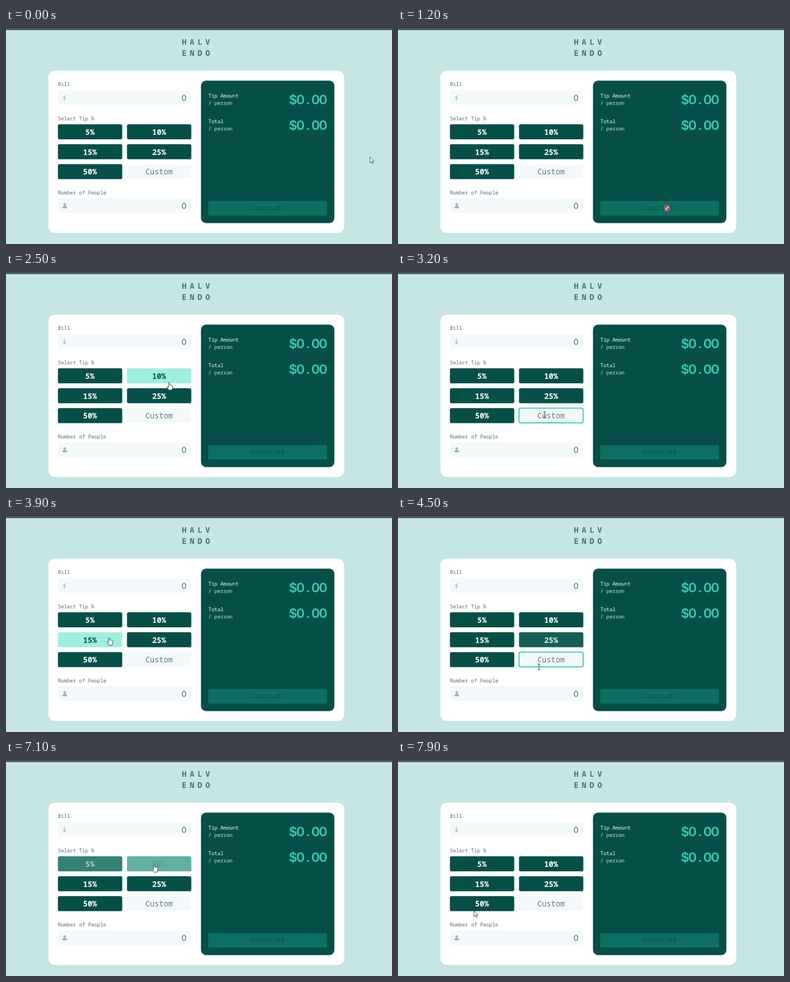
These frames come from a looping animation (690x388 px, 8 s). An HTML page:

```html
<!DOCTYPE html>
<html lang="en">
<head>
<meta charset="utf-8">
<title>Tip calculator</title>
<style>
  html, body { margin: 0; width: 100%; height: 100%; overflow: hidden; background: #c5e6e5; }
  svg { display: block; width: 690px; height: 388px; }
  text { font-family: "Noto Sans Mono", "DejaVu Sans Mono", monospace; white-space: pre; }
  .title { font-size: 13.5px; font-weight: 700; letter-spacing: 5.9px; fill: #4c6c6e; }
  .label { font-size: 9px; font-weight: 500; fill: #566b6c; }
  .tip { font-size: 13.8px; font-weight: 700; text-anchor: middle; }
  .hint { font-size: 13.6px; font-weight: 500; fill: #5e7c7d; text-anchor: middle; }
  .sign { font-size: 10.5px; font-weight: 600; fill: #9eb7b9; }
  .line { font-size: 9px; font-weight: 500; fill: #f4fbfa; }
  .sub { font-size: 9px; fill: #cde6e2; }
  .value { font: 500 13.8px Inter, sans-serif; fill: #5e7778; text-anchor: middle; }
  .sum { font: 600 23.2px Inter, sans-serif; fill: #34cdae; text-anchor: middle; }
  .calc { font: 10.7px "Liberation Sans", Arial, sans-serif; fill: #08534b; text-anchor: middle; }
</style>
</head>
<body>
<svg id="stage" viewBox="0 0 690 388" xmlns="http://www.w3.org/2000/svg"></svg>
<script>
const NS = 'http://www.w3.org/2000/svg';
const stage = document.getElementById('stage');
const LOOP = 8000, STEP = 100, FADE = 200;

function add(tag, attrs, parent = stage) {
  const el = document.createElementNS(NS, tag);
  for (const key in attrs) el.setAttribute(key, attrs[key]);
  parent.appendChild(el);
  return el;
}
const rect = (x, y, width, height, rx, fill) => add('rect', { x, y, width, height, rx, fill });
function text(str, x, y, cls) {
  const el = add('text', { x, y, class: cls });
  el.textContent = str;
  return el;
}

// Page and card
rect(0, 0, 690, 388, 0, '#c5e6e5');
rect(0, 0, 690, 3.7, 0, '#47565c');
text('HALV', 314.5, 30, 'title');
text('ENDO', 314.5, 50, 'title');
rect(75.8, 76.8, 528.8, 291.4, 12, '#fff');

// Form
const LEFT = 92.8, COL = 123.5, ROW = 35.7, TOP = 173;

function field(x, y, w, h) {
  return { x, y, w, h, kind: 'beam', box: rect(x, y, w, h, 3, '#f3f9fb') };
}
const bill = field(LEFT, 112, 238, 26);
const people = field(LEFT, 306, 238, 26.5);
const custom = field(LEFT + COL, TOP + 2 * ROW, 114.6, 26.6);
const fields = [bill, people, custom];

text('Bill', LEFT, 104.4, 'label');
text('Select Tip %', LEFT, 165.6, 'label');
text('Number of People', LEFT, 299.2, 'label');
text('$', 101.5, 129, 'sign');
add('circle', { cx: 105, cy: 317.1, r: 2.3, fill: '#9eb3b6' });
add('path', { d: 'M101 324v-1.6q0-2.6 2.6-2.6h2.8q2.6 0 2.6 2.6v1.6z', fill: '#9eb3b6' });
for (const f of [bill, people]) text('0', 318.2, f.y + 18.5, 'value');
text('Custom', 273.6, 263, 'hint');

const buttons = ['5%', '10%', '15%', '25%', '50%'].map((name, i) => {
  const x = LEFT + (i % 2) * COL, y = TOP + (i >> 1) * ROW;
  const box = rect(x, y, 115, 27, 3, '#064f49');
  const label = text(name, x + 57.3, y + 18.8, 'tip');
  return { x, y, w: 115, h: 26, box, label, kind: 'hand' };
});

// Result panel
rect(348.5, 94.5, 238.5, 256, 9, '#064f49');
['Tip Amount', 'Total'].forEach((name, i) => {
  const y = 125 + i * 46;
  text(name, 361.8, y, 'line');
  text('/ person', 361.8, y + 13.2, 'sub');
  [...'$0.00'].forEach((ch, n) => text(ch, 513 + n * 13.5, y + 12.2, 'sum'));
});
rect(361.5, 311, 212, 26, 2, '#0e6e62');
text('CALCULATE', 467.5, 328.2, 'calc');

// Areas that only change the pointer
const zones = [
  { x: 361.5, y: 311, w: 212, h: 26, kind: 'no' },
  { x: LEFT, y: 156, w: 238, h: 12, kind: 'beam' }
];
const areas = [...buttons, ...fields, ...zones];

// Pointer shapes, hot spot at 0,0
const cursors = {};
const cursor = kind => cursors[kind] = add('g', {});
add('path', {
  d: 'M0 0V10.4L2.4 8.2 4 12 5.8 11.2 4.2 7.6H7.3Z',
  fill: '#fff', stroke: '#3a4648', 'stroke-width': 0.9, 'stroke-linejoin': 'round'
}, cursor('arrow'));
add('path', {
  d: 'M-1.1 .6Q0-.8 1.1 .6V4.6Q5 3.6 6.4 7V10L5 13.6H-.4L-3.9 8.6Q-3.4 6.4-1.1 8.6Z',
  fill: '#fff', stroke: '#263638', 'stroke-width': 0.9, 'stroke-linejoin': 'round'
}, cursor('hand'));
add('path', {
  d: 'M-2.4-5H2.4M0-5V5M-2.4 5H2.4',
  fill: 'none', stroke: '#344446', 'stroke-width': 1
}, cursor('beam'));
const no = cursor('no');
add('circle', { r: 5.4, fill: '#fff' }, no);
add('path', {
  d: 'M-4.1 0A4.1 4.1 0 1 1 4.1 0A4.1 4.1 0 1 1-4.1 0M-2.9-2.9L2.9 2.9',
  fill: 'none', stroke: '#b3232d', 'stroke-width': 2
}, no);

// Key points of the pointer's walk: seconds, x, y
const stops = [
  [0, 650.5, 231.5], [0.4, 481, 323.5], [1.7, 481, 323.5],
  [1.9, 310, 318], [2.3, 286, 195], [2.5, 291.5, 198.5],
  [3.2, 262, 256], [3.5, 150, 250], [3.9, 184.5, 218.5],
  [4.1, 240, 187], [4.5, 252, 271], [5.3, 212, 320],
  [5.5, 212, 190], [5.8, 212, 190], [5.9, 160, 175], [6.1, 166.5, 161],
  [6.3, 200, 127], [6.7, 200, 127], [6.9, 180, 186], [7.1, 265, 188],
  [7.3, 160, 222], [7.5, 250, 258], [7.7, 215, 274], [7.9, 135.8, 270.7]
];

function pointer(ms) {
  const t = Math.max(0, ms / 1000);
  const next = stops.findIndex(s => s[0] > t);
  if (next < 0) return stops[stops.length - 1].slice(1);
  const [t0, x0, y0] = stops[next - 1], [t1, x1, y1] = stops[next];
  const k = (t - t0) / (t1 - t0);
  return [x0 + (x1 - x0) * k, y0 + (y1 - y0) * k];
}

const inside = (a, [x, y]) => x >= a.x && x <= a.x + a.w && y >= a.y && y <= a.y + a.h;

// Linear hover fade: share of the last FADE ms spent over the area
function hover(area, ms) {
  let hits = 0;
  for (let d = 0; d < FADE; d += 10) if (inside(area, pointer(ms - d))) hits++;
  return hits * 10 / FADE;
}

const mix = (a, b, k) => `rgb(${a.map((v, i) => Math.round(v + (b[i] - v) * k))})`;

function draw(time) {
  const ms = Math.floor(time % LOOP / STEP) * STEP;
  const pos = pointer(ms);

  for (const b of buttons) {
    const k = hover(b, ms);
    b.box.setAttribute('fill', mix([6, 79, 73], [160, 238, 222], k));
    b.label.setAttribute('fill', mix([255, 255, 255], [10, 82, 76], k));
  }
  for (const f of fields) {
    f.box.setAttribute('stroke', inside(f, pos) ? '#45cfb1' : 'none');
    f.box.setAttribute('stroke-width', 2);
  }

  const over = areas.find(a => inside(a, pos));
  const kind = over ? over.kind : 'arrow';
  for (const name in cursors) {
    cursors[name].setAttribute('visibility', name === kind ? 'visible' : 'hidden');
  }
  cursors[kind].setAttribute('transform', `translate(${pos[0].toFixed(2)} ${pos[1].toFixed(2)})`);
}

let start;
function tick(now) {
  if (start === undefined) start = now;
  draw(Math.max(0, now - start));
  requestAnimationFrame(tick);
}
draw(0);
requestAnimationFrame(tick);
</script>
</body>
</html>
```
